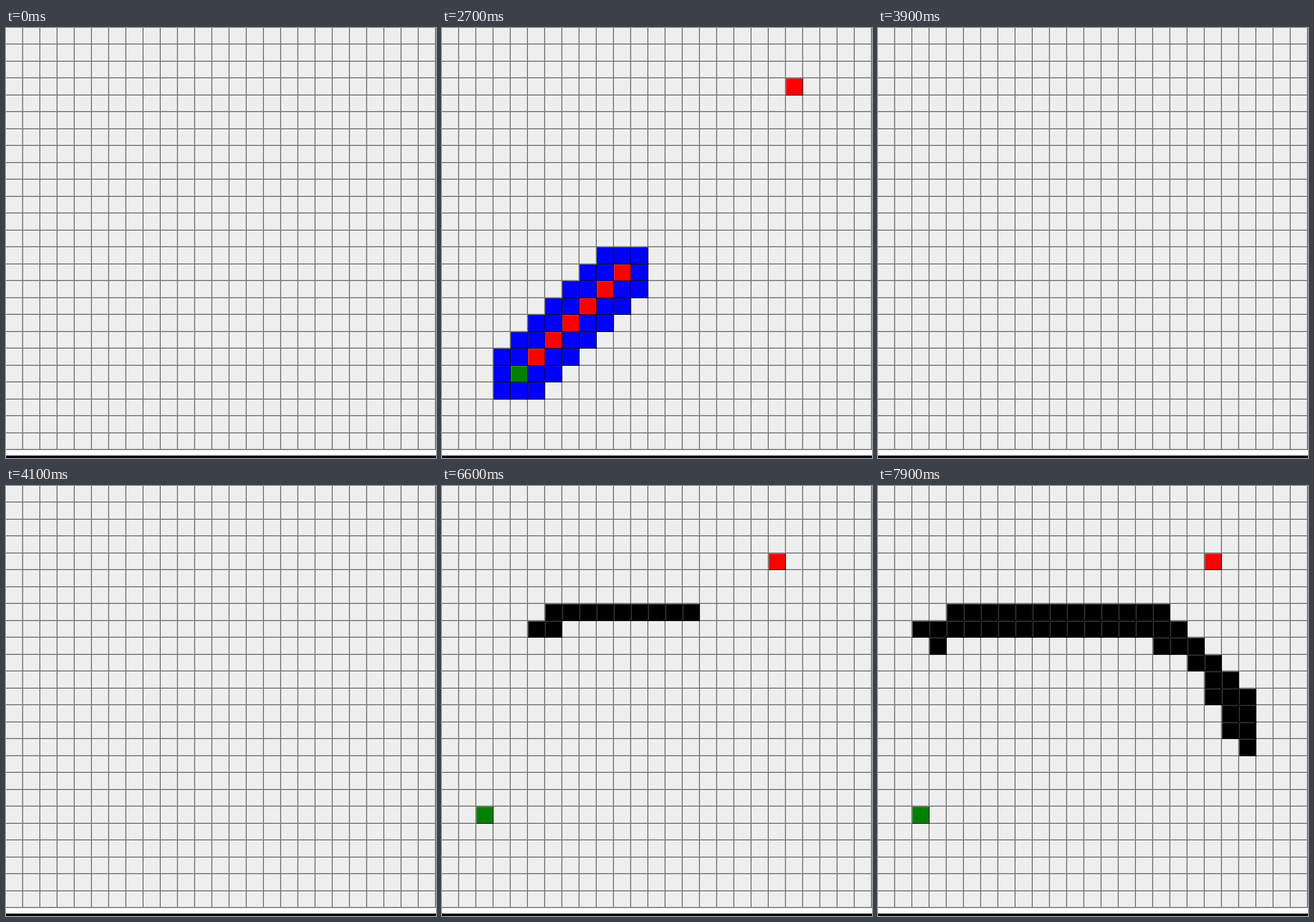
These frames come from a looping animation (700 by 700 pixels, 8 s). An HTML page with a canvas:

```html
<!DOCTYPE html>
<html lang="en">
<head>
<meta charset="utf-8">
<title>Grid path search</title>
<style>
  html, body { margin: 0; width: 100%; height: 100%; overflow: hidden; background: #fff; }
  canvas { display: block; width: 700px; height: 700px; }
</style>
</head>
<body>
<canvas id="stage" width="700" height="700"></canvas>
<script>
const LOOP = 8000, SIZE = 25, CELL_W = 28, CELL_H = 27.5;
const ctx = document.getElementById('stage').getContext('2d');

// fill, top-left edge, inner and outer bottom-right edge
const LOOKS = {
  plain: ['#eeeeee', '#f8f8f8', '#a0a0a0', '#707070'],
  green: ['#008000', '#4c8c4c', '#006800', '#002800'],
  red:   ['#ff0000', '#d04848', '#d80000', '#480000'],
  blue:  ['#0000ff', '#1c1c8c', '#0000d8', '#000048'],
  black: ['#000000', '#484848', '#101010', '#080808']
};

const events = [];
const at = (time, col, row, look) => events.push({ time, col, row, look });

function click(down, up, col, row, look) {
  at(down, col, row, 'pressed');
  at(up, col, row, look);
}

// Each expanded cell turns red and its free neighbours turn blue.
function search(start, step, col, row, count) {
  const closed = new Set();
  for (let i = 0; i < count; i++) {
    const c = col + i, r = row - i, time = start + i * step;
    closed.add(c + ',' + r);
    if (i) at(time, c, r, 'red');
    for (let dy = -1; dy <= 1; dy++) {
      for (let dx = -1; dx <= 1; dx++) {
        const goal = c + dx === 20 && r + dy === 3;
        if (!goal && !closed.has((c + dx) + ',' + (r + dy))) at(time, c + dx, r + dy, 'blue');
      }
    }
  }
}

function stroke(start, step, cells) {
  cells.forEach(([col, row], i) => at(start + i * step, col, row, 'black'));
}

function run(from, to, row) {
  const dir = Math.sign(to - from) || 1;
  return Array.from({ length: Math.abs(to - from) + 1 }, (_, i) => [from + i * dir, row]);
}

click(700, 850, 4, 20, 'green');
click(1900, 2000, 20, 3, 'red');
search(2550, 25, 4, 20, 17);
events.push({ time: 3500, clear: true });

click(4850, 5000, 2, 19, 'green');
click(5350, 5500, 19, 4, 'red');

// Out along the top and down the right side, then back on the inner side.
stroke(6350, 24, [
  ...run(5, 6, 8), ...run(6, 16, 7), [17, 8], [18, 9], [19, 10], [20, 11],
  [21, 12], [21, 13], [21, 14], [21, 15],
  [20, 14], [20, 13], ...run(20, 19, 12), [19, 11], [18, 10]
]);
stroke(7050, 25, [...run(17, 16, 9), ...run(16, 14, 8)]);
stroke(7200, 0, run(13, 12, 8));
stroke(7350, 0, [...run(4, 3, 8), [3, 9]]);
stroke(7500, 40, [[2, 8], ...run(4, 5, 7), ...run(7, 11, 8)]);
events.sort((a, b) => a.time - b.time);

function rect(color, x, y, w, h) {
  ctx.fillStyle = color;
  ctx.fillRect(x, y, w, h);
}

function drawCell(col, row, look) {
  const x = col * CELL_W, y = Math.floor(row * CELL_H);
  const w = CELL_W, h = Math.floor((row + 1) * CELL_H) - y;
  if (look === 'pressed') {
    rect('#ffffff', x, y, w, h);
    rect('#a0a0a0', x, y, w - 1, h - 1);
    rect('#707070', x + 1, y + 1, w - 2, h - 2);
    rect('#f2f2f2', x + 2, y + 2, w - 4, h - 4);
    return;
  }
  const [fill, light, shade, dark] = LOOKS[look];
  rect(dark, x, y, w, h);
  rect(shade, x, y, w - 1, h - 1);
  rect(light, x, y, w - 2, h - 2);
  rect(fill, x + 1, y + 1, w - 3, h - 3);
}

function draw(time) {
  const looks = new Map();
  for (const e of events) {
    if (e.time > time) break;
    if (e.clear) looks.clear();
    else looks.set(e.row * SIZE + e.col, e.look);
  }
  rect('#ffffff', 0, 0, 700, 700);
  for (let i = 0; i < SIZE * SIZE; i++) {
    drawCell(i % SIZE, Math.floor(i / SIZE), looks.get(i) || 'plain');
  }
  rect('#000000', 0, 696, 700, 4);
}

const begin = performance.now();
function tick() {
  draw((performance.now() - begin) % LOOP);
  requestAnimationFrame(tick);
}
tick();
</script>
</body>
</html>
```
